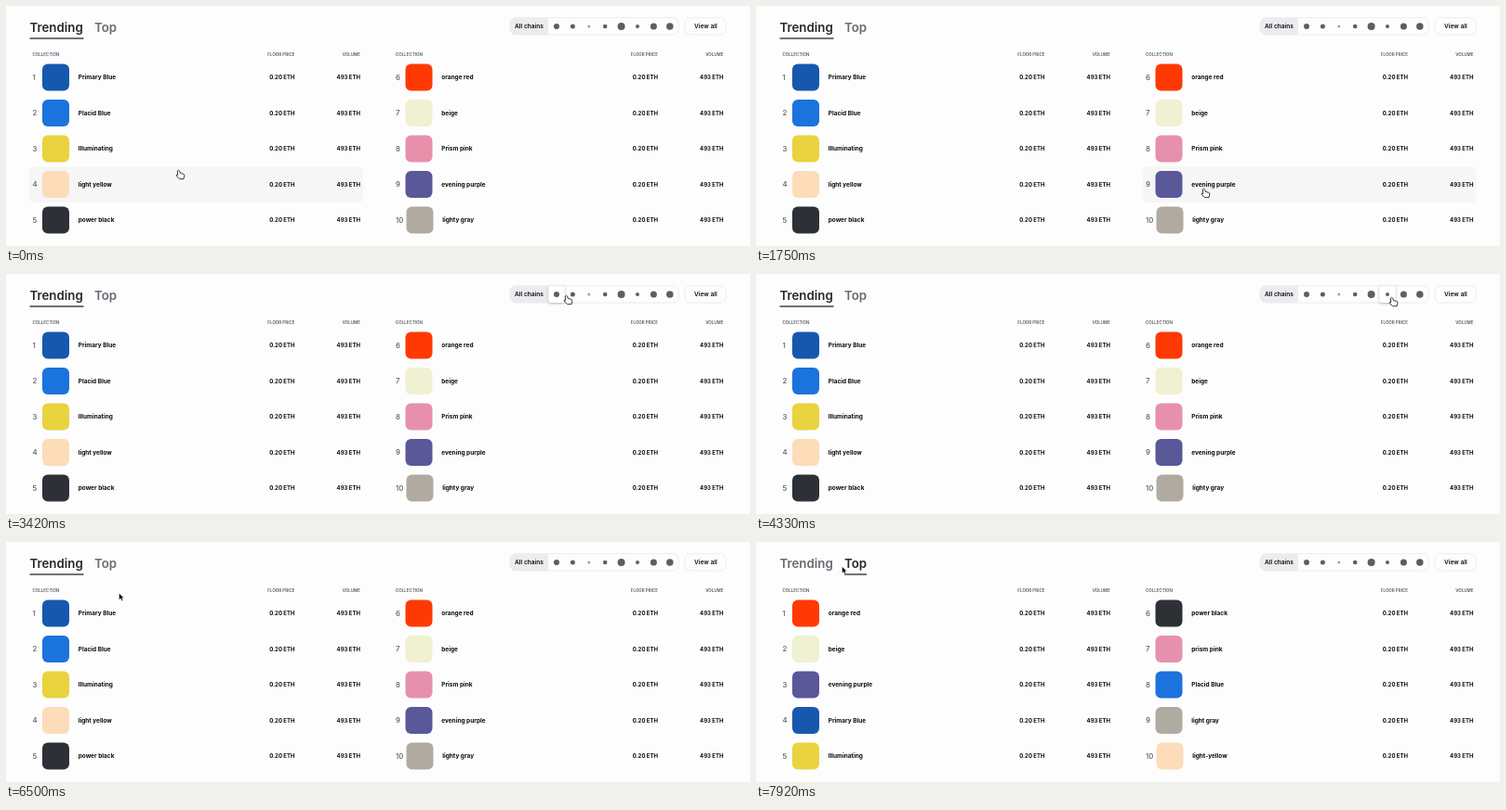
These frames come from a looping animation (800 by 259 pixels, 8 s). An HTML page:

```html
<!DOCTYPE html>
<html lang="en">
<head>
<meta charset="utf-8">
<style>
  html, body { margin: 0; height: 100%; overflow: hidden; background: #fdfdfd; }
  svg { display: block; width: 800px; height: 259px; font: 700 6.5px Inter, sans-serif; }
</style>
</head>
<body>
<svg id="stage" viewBox="0 0 800 259"></svg>
<script>
const LOOP = 8000, STEP = 1000 / 12, SWITCH = 6820;
const INK = '#0b0d10', DARK = '#25282d', GRAY = '#666b71', LABEL = '#575b61';
const COLUMN = 390.5, ROW = 38.5, FIRST_ROW = 77, TILE = 17.4, FIRST_TILE = 592;

const colors = {
  'primary blue': '#1658ad', 'placid blue': '#1b73dd', 'illuminating': '#e9d33e',
  'light yellow': '#fcdcb9', 'power black': '#2d3035', 'orange red': '#ff3903',
  'beige': '#f0f0d2', 'prism pink': '#e790ac', 'evening purple': '#5a5899',
  'light gray': '#b0aaa0', 'lighty gray': '#b0aaa0'
};
const trending = ['Primary Blue', 'Placid Blue', 'Illuminating', 'light yellow', 'power black',
  'orange red', 'beige', 'Prism pink', 'evening purple', 'lighty gray'];
const topTen = ['orange red', 'beige', 'evening purple', 'Primary Blue', 'Illuminating',
  'power black', 'prism pink', 'Placid Blue', 'light gray', 'light-yellow'];
const chainSizes = [6, 5, 3, 4.5, 8, 4, 7, 7.5];

// Pointer stops; it eases from one to the next
const stops = [
  { t: 0, x: 185.5, y: 177 }, { t: 917, x: 409.5, y: 105.2 }, { t: 1750, x: 481.5, y: 197 },
  { t: 3417, x: 602.5, y: 23 }, { t: 4170, x: 682, y: 25 }, { t: 5250, x: 707.5, y: 27 },
  { t: 6080, x: 290, y: 4 }, { t: 6500, x: 121.5, y: 55.2 }, { t: 6900, x: 106, y: 28 },
  { t: 7833, x: 106, y: 28 }, { t: 7916, x: 92.5, y: 26.5 }, { t: LOOP, x: 92.5, y: 26.5 }
];

const text = (x, y, s, { size = 6.5, fill = INK, anchor = 'start', weight = 700 } = {}) =>
  `<text x="${x}" y="${y}" font-size="${size}" font-weight="${weight}" fill="${fill}" text-anchor="${anchor}">${s}</text>`;
const rect = (x, y, w, h, r, fill, extra = '') =>
  `<rect x="${x}" y="${y}" width="${w}" height="${h}" rx="${r}" fill="${fill}" ${extra}/>`;
const pill = (x, w) => rect(x, 12.7, w, 18.3, 6.5, '#fdfdfd', 'stroke="#e6e7e9" stroke-width=".8"');
const within = (v, from, to) => v > from && v < to;

function pointerAt(t) {
  const i = Math.max(1, stops.findIndex(s => s.t >= t));
  const a = stops[i - 1], b = stops[i];
  const u = (t - a.t) / (b.t - a.t), e = u * u * (3 - 2 * u);
  return [a.x + (b.x - a.x) * e, a.y + (b.y - a.y) * e];
}

function tab(x, w, label, active) {
  return text(x, 28, label, { size: 13.3, fill: active ? DARK : GRAY, weight: 600 }) +
    (active ? rect(x, 34.3, w, 1.3, 0, DARK) : '');
}

function filters(hovered) {
  const label = { size: 6.6, anchor: 'middle', weight: 600 };
  const marks = chainSizes.map((size, i) => {
    const x = FIRST_TILE + TILE * i;
    const tile = i === hovered ? rect(x - TILE / 2, 12.7, TILE, 18.3, 3, '#fff',
      'style="filter:drop-shadow(0 1px 1.5px #0004)"') : '';
    return tile + `<circle cx="${x}" cy="22" r="${size / 2}" fill="${size < 4 ? '#a2a4a8' : '#5b5e63'}"/>`;
  });
  return pill(541.9, 181.4) +
    '<path d="M583 12.7H548.4a6.5 6.5 0 0 0-6.5 6.5v5.3a6.5 6.5 0 0 0 6.5 6.5H583z" fill="#ebecee"/>' +
    text(562.5, 24.3, 'All chains', label) + marks.join('') +
    pill(729.9, 44.4) + text(752.3, 24.3, 'View all', label);
}

function table(names, hovered) {
  const heading = { size: 4.5, fill: LABEL, weight: 600 };
  const headingEnd = { ...heading, anchor: 'end' };
  const price = { size: 6, anchor: 'end' };
  let out = '';
  for (const x of [0, COLUMN]) {
    out += text(28.5 + x, 54.4, 'COLLECTION', heading) +
      text(310.5 + x, 54.4, 'FLOOR PRICE', headingEnd) + text(381 + x, 54.4, 'VOLUME', headingEnd);
  }
  names.forEach((name, i) => {
    const x = i < 5 ? 0 : COLUMN, y = FIRST_ROW + ROW * (i % 5);
    const shift = i > 8 ? 1 : 0; // room for the two-digit rank
    const color = colors[name.toLowerCase().replace('-', ' ')];
    if (i === hovered) out += rect(25 + x, y - ROW / 2, 359, ROW, 4, '#f6f6f7');
    out += text(28.5 + x, y + 2.8, i + 1, { size: 7.8, fill: LABEL, weight: 500 }) +
      rect(39 + x + shift, y - 14.5, 29, 29, 6, color) +
      text(77.7 + x + shift, y + 2.4, name) +
      text(310.5 + x, y + 2.3, '0.20 ETH', price) + text(381 + x, y + 2.3, '493 ETH', price);
  });
  return out;
}

function pointer(x, y, hand) {
  const shape = hand
    ? '<path d="M-1.2 1Q0-.8 1.1 1l.7 2.4 3.4.9q1.5.5 1.1 2L5.5 9.6H1L-2.4 6.3q-.5-1.6 1.6-.8z" fill="#fff" stroke="#222" stroke-width=".9" stroke-linejoin="round"/>'
    : '<path d="M0 0v7.2l1.7-1.5 1.2 2.7 1.4-.6-1.2-2.6h2.3z" fill="#000" stroke="#fff" stroke-width=".5"/>';
  return `<g transform="translate(${x} ${y})">${shape}</g>`;
}

function draw(t) {
  const [x, y] = pointerAt(t), onTop = t >= SWITCH;
  const column = [0, 1].find(c => within(x - c * COLUMN, 25, 384)) ?? -1;
  const line = Math.floor((y - FIRST_ROW) / ROW + 0.5);
  const row = column >= 0 && within(line, -1, 5) ? column * 5 + line : -1;
  const inBar = within(y, 12, 31);
  const tile = inBar ? Math.floor((x - 2 - FIRST_TILE) / TILE + 0.5) : -1;
  const onTab = inBar && (within(x, 25, 83) || within(x, 95, 119));
  const hand = row >= 0 || within(tile, -1, chainSizes.length) || onTab;
  stage.innerHTML = tab(25.5, 58, 'Trending', !onTop) + tab(95, 24, 'Top', onTop) +
    filters(tile) + table(onTop ? topTen : trending, row) + pointer(x, y, hand);
}

const stage = document.getElementById('stage');
let last = -1;
function tick() {
  const step = Math.floor((performance.now() % LOOP + 4) / STEP);
  if (step !== last) draw(Math.min(step * STEP, LOOP));
  last = step;
  requestAnimationFrame(tick);
}
tick();
</script>
</body>
</html>
```
